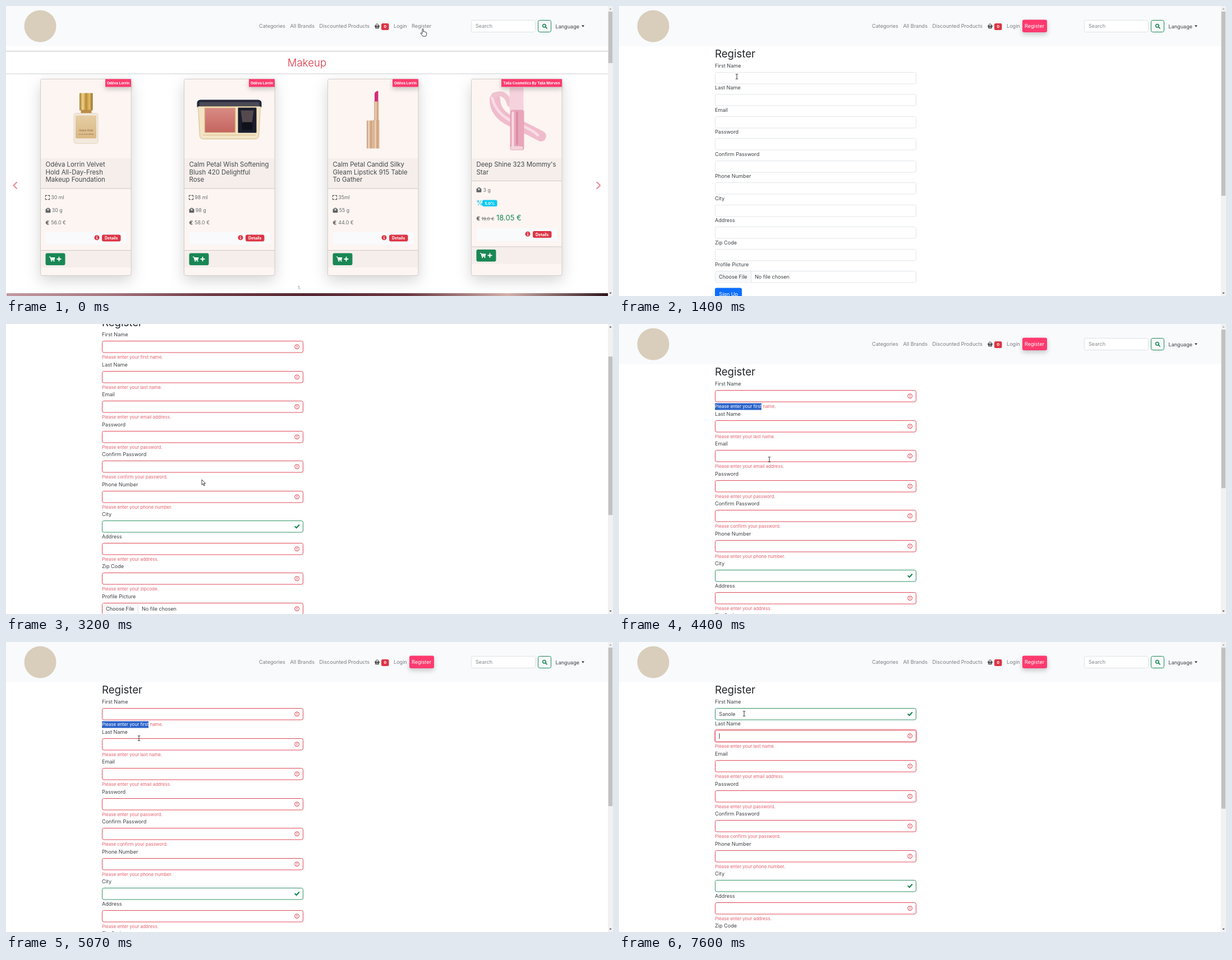
Animation, 1082 px wide and 518 px high, one loop 8000 ms. Source, as an HTML page:

```html
<!DOCTYPE html>
<html lang="en">
<head>
<meta charset="utf-8">
<title>Shop registration</title>
<style>
  html, body { margin: 0; width: 100%; height: 100%; overflow: hidden; background: #fff; }
  svg { display: block; width: 1082px; height: 518px; }
  text { font-family: Inter, "Open Sans", sans-serif; font-weight: 400; white-space: pre; }
  .bold { font-weight: 700; }
  .mid { text-anchor: middle; }
  .thin { font-weight: 300; }
  .line { fill: none; stroke-linecap: round; stroke-linejoin: round; }
  .card { filter: drop-shadow(0 9px 13px rgba(0, 0, 0, .17)); }
  .lift { filter: drop-shadow(0 4px 4px rgba(0, 0, 0, .2)); }
</style>
</head>
<body>
<svg id="stage" viewBox="0 0 1082 518"></svg>
<script>
const RED = '#dc3545', GREEN = '#198754', PINK = '#ff3a6e', INK = '#3d4145', GREY = '#7c7f82';
const LOOP = 8000, STEP = 200 / 3;
const ROW = 39.45, ERROR_HEIGHT = 14.1;

const text = (x, y, s, size = 9.1, fill = INK, cls = '', extra = '') =>
  `<text x="${x}" y="${y}" font-size="${size}" fill="${fill}" class="${cls}" ${extra}>${s}</text>`;
const rect = (x, y, w, h, fill, rx = 0, extra = '') =>
  `<rect x="${x}" y="${y}" width="${w}" height="${h}" rx="${rx}" fill="${fill}" ${extra}/>`;
const path = (d, fill, extra = '') => `<path d="${d}" fill="${fill}" ${extra}/>`;
const line = (d, color, width = 1, extra = '') =>
  `<path d="${d}" class="line" stroke="${color}" stroke-width="${width}" ${extra}/>`;
const group = (content, extra = '') => `<g ${extra}>${content}</g>`;
const at = (x, y, content) => group(content, `transform="translate(${x} ${y})"`);
const gradient = (id, colors, vertical) =>
  `<linearGradient id="${id}" ${vertical ? 'x2="0" y2="1"' : ''}>` +
  colors.map((c, i) => `<stop offset="${i / (colors.length - 1)}" stop-color="${c}"/>`).join('') +
  '</linearGradient>';

const icons = {
  basket: path('M-4.5-1h9v1.4h-.7L3 4.2h-6L-3.8.4h-.7z', '#444') +
    line('M-2.8-1 -.9-4M2.8-1 .9-4', '#444', 1.2) + line('M-1.4 1v2M0 1v2M1.4 1v2', '#f8f9fa', .6),
  search: line('M1.2 1.2 3.8 3.8', GREEN, 1.7) + `<circle cx="-.8" cy="-.8" r="2.8" fill="none" stroke="${GREEN}" stroke-width="1.5"/>`,
  expand: line('M-3.6-1.2v-2.4h2.4M1.2-3.6h2.4v2.4M3.6 1.2v2.4h-2.4M-1.2 3.6h-2.4v-2.4', '#555', 1.1),
  weight: rect(-4.4, -2.4, 8.8, 6.6, '#5f6265', 1) + '<circle cy="-1.5" r="3" fill="#5f6265"/><circle cy="-1.2" r="1.7" fill="#fcf5f2"/>' + line('M0-.8.7-2', '#5f6265', .8),
  euro: line('M2.2-2.8Q-1.6-4.4-1.6 0T2.2 2.8M-2.8-.8h4M-2.8.9h3.6', '#555', 1.2),
  info: `<circle r="4.5" fill="${RED}"/>` + line('M-.5-.3h.6v2.2m-.8.1h1.6', '#fff', 1) + '<circle cy="-2.2" r=".8" fill="#fff"/>',
  cart: line('M-5.2-3.8h1.6l1.5 5.6h5.6', '#fff', 1.2) + path('M-3.4-3h8.4L4 1h-6.2z', '#fff') +
    '<circle cx="-1.3" cy="3.6" r="1.1" fill="#fff"/><circle cx="3" cy="3.6" r="1.1" fill="#fff"/>',
  plus: line('M-3.2 0h6.4M0-3.2v6.4', '#fff', 1.9),
  alert: `<circle r="3.9" fill="none" stroke="${RED}" stroke-width="1"/>` + line('M0-1.8v2M0 1.8v.1', RED, 1.1),
  check: line('M-3.4.3-1 2.7 3.6-2.5', GREEN, 2.1),
  login: line('M-4 0h5M-.8-2.4 1.6 0-.8 2.4M2-3.4h2v6.8h-2', '#555', 1.4),
  home: path('M-5 .3 0-4.2 5 .3 4.3 1 3.6.5V4H1V1h-2v3h-2.6V.5L-4.3 1z', '#555'),
};

function header() {
  const register = rect(719, 24.5, 44, 22.5, PINK, 3, 'class="lift"') + text(723, 39.2, 'Register', 9.1, '#fff');
  return rect(0, 0, 1073, 71.5, '#f8fafc') +
    '<circle cx="61" cy="36" r="28.5" fill="#d9cebb"/>' +
    [[451, 'Categories'], [506.5, 'All Brands'], [558.5, 'Discounted Products'], [691, 'Login'], [723, 'Register']]
      .map(([x, s]) => text(x, 39.2, s, 9.1, GREY)).join('') +
    at(661.5, 36, icons.basket) + rect(669, 31, 13.5, 12, RED, 2.5) + text(675.8, 39.4, '0', 6.8, '#fff', 'bold mid') +
    group(register, 'id="register"') +
    rect(829.5, 25.5, 114, 21, '#fff', 3, 'stroke="#dee2e6"') + text(837, 39.4, 'Search', 9.1, '#85888b') +
    rect(948.5, 25.5, 23, 21, '#f8fafc', 3, `stroke="${GREEN}"`) + at(960.3, 36, icons.search) +
    text(979.5, 39.6, 'Language') + path('M1026 34.5h5l-2.5 2.9z', '#222');
}

const products = [
  {
    brand: 'Odéva Lorrin', tag: 46, title: ['Odéva Lorrin Velvet', 'Hold All-Day-Fresh', 'Makeup Foundation'],
    size: '30 ml', weight: '30 g', price: '56.0 €',
    art: rect(69.5, 25, 23.5, 31, 'url(#gold)', 1) + rect(72, 55, 19, 8, '#b98d45') +
      rect(59.5, 61, 43, 54, '#f3e9dd', 4, 'stroke="#d9c9b5" stroke-width=".7"') + rect(62.5, 65, 37, 41, 'url(#cream)', 2) +
      text(81, 93, 'Velvet Hold', 4.6, '#7a6141', 'mid') + text(81, 99, 'All-Day-Fresh Makeup', 2.6, '#7a6141', 'mid'),
  },
  {
    brand: 'Odéva Lorrin', tag: 46, title: ['Calm Petal Wish Softening', 'Blush 420 Delightful', 'Rose'],
    size: '98 ml', weight: '98 g', price: '58.0 €',
    art: path('M23 50V42Q24 37 30 37H131Q137 37 138 42V50z', '#222638') + rect(27, 41, 107, 8, '#4a4a56', 2) +
      path('M25 49H136L133 102Q132 107 127 107H34Q29 107 28 102z', '#f3e4c6', 'stroke="#cfae72" stroke-width=".8"') +
      rect(36, 51, 56, 45, '#d9b782', 1) + rect(37.5, 52, 53, 43, 'url(#blush)', 1) +
      rect(96, 51, 33, 45, '#1b1d2b', 1) + path('M101 56h23l-3 22h-17z', '#544a4d') + rect(103, 77, 19, 14, '#0f111b', 2) +
      line('M34 100H127', '#d8bb84', 1),
  },
  {
    brand: 'Odéva Lorrin', tag: 46, title: ['Calm Petal Candid Silky', 'Gleam Lipstick 915 Table', 'To Gather'],
    size: '35ml', weight: '55 g', price: '44.0 €',
    art: path('M83.5 41V26Q84 22 90 21V41z', '#d42c79') + rect(83, 40, 8, 35, 'url(#copper)') +
      rect(81, 73, 11, 51, 'url(#copper)') + rect(69.5, 74, 11, 50, 'url(#copper)', 1),
  },
  {
    brand: 'Talia Cosmetics By Talia Morven', tag: 108, title: ["Deep Shine 323 Mommy's", 'Star'], weight: '3 g', sale: true,
    art: line('M42 36Q42 62 72 76T124 102', '#f0bccd', 19) + line('M37 33Q44 64 78 78T118 100', '#f8dbe5', 5) +
      line('M40 29Q62 20 68 45', '#f0c3d1', 9) +
      rect(68, 15, 25, 41, '#f6d2dd', 2) + rect(69, 55, 25, 72, '#e9a6ba', 4) +
      rect(72, 58, 4, 64, '#f8d9e2', 2) + rect(80, 58, 3, 60, '#d988a2', 1) + rect(70, 120, 22, 6, '#f4d5dd', 3),
  },
];

function card(p, i) {
  const x = 61.5 + 256 * i, up = p.sale ? 6.5 : 0, titleEnd = p.sale ? 182 : 195.5;
  const label = (lx, y, s) => text(lx, y, s, 8.9, '#6b6f72');
  const spec = (y, icon, s) => at(12.5, y, icons[icon]) + label(18.7, y + 3.3, s);
  const specs = p.sale
    ? at(13.5, 198, icons.weight) + label(21, 201.3, p.weight) +
      text(9, 225, '%', 11.5, '#0dcaf0', 'bold') + rect(19.5, 216, 26.5, 11.5, '#0dcaf0', 2.5) + text(32.8, 224.4, '5.0%', 6.8, '#fff', 'bold mid') +
      at(12.5, 249, icons.euro) + text(18, 252, '19.0 €', 8, '#6b6f72', '', 'text-decoration="line-through"') +
      text(44.5, 252.3, '18.05 €', 13, GREEN)
    : spec(211.5, 'expand', p.size) + at(13.5, 234.5, icons.weight) + label(20.2, 237.8, p.weight) +
      spec(256.5, 'euro', p.price);
  const actions =
    rect(9, 273, 144, 23, '#f8fafc', 3) + at(100.5, 283.3, icons.info) +
    rect(109.5, 278, 33.5, 12, RED, 3) + text(126.2, 286.6, 'Details', 6.9, '#fff', 'bold mid') +
    rect(0, 306, 161, 30.5, '#f5eeeb') + line('M0 306H161', '#cfc8c5') +
    rect(9, 311, 35, 21.5, GREEN, 3) + at(21, 321.5, icons.cart) + at(33, 321.5, icons.plus);
  return at(x, 130.5,
    rect(0, 0, 161.5, 351, '#fcf5f2', 3, 'class="card"') + p.art +
    rect(0, 141.5, 161, titleEnd - 141.5, '#f5eeeb') + line(`M0 ${titleEnd}H161`, '#cfc8c5') +
    p.title.map((s, n) => text(9, 156.5 + 13.5 * n, s, 11.4, '#44484b')).join('') +
    specs + at(0, -up, actions) +
    rect(0, 0, 161.5, 351, 'none', 3, 'stroke="#d3ccc9"') +
    rect(161.5 - p.tag, 0, p.tag, 14, PINK, 0, 'class="lift"') +
    text(161.5 - p.tag / 2, 9.4, p.brand, 6.4, '#fff', 'bold mid'));
}

function home() {
  const rule = y => line(`M0 ${y}H1073`, '#cdcfd1') + line(`M0 ${y + 1}H1073`, '#eee');
  return rule(80.5) + rule(121) + text(536.5, 108, 'Makeup', 18.6, RED, 'thin mid') +
    products.map(card).join('') +
    line('M19 315 13.5 320.5 19 326M1053.5 315 1059 320.5 1053.5 326', RED, 2.4, 'opacity=".55"') +
    text(520, 506, '1.', 8, GREY) + rect(1, 513, 1072, 5, 'url(#banner)');
}

const fields = [
  ['First Name', 'enter your first name'], ['Last Name', 'enter your last name'], ['Email', 'enter your email address'],
  ['Password', 'enter your password'], ['Confirm Password', 'confirm your password'], ['Phone Number', 'enter your phone number'],
  ['City'], ['Address', 'enter your address'], ['Zip Code', 'enter your zipcode'], ['Profile Picture', 'choose your picture'],
];

function field([label, message], i) {
  const isFile = i === 9;
  const note = color => text(171, 150.4, `Please ${message}.`, 8, color);
  const selected = i ? '' : group(rect(171, 141.5, 83, 12, '#2a62c9') + note('#fff'),
    'class="selection" clip-path="url(#selected)"');
  return group(
    text(171, 110.2, label) +
    rect(170.4, 117.4, 360.2, 22.7, 'none', 4, 'class="ring" stroke-width="2.6" stroke-opacity=".28" opacity="0"') +
    rect(171.5, 118.5, 358, 20.5, '#fff', 3, 'class="box" stroke-width=".9"') +
    (isFile ? rect(172, 119, 63, 19.5, '#f8f9fa', 2) + line('M235.5 119V138.5', '#dee2e6', 1, 'class="box"') +
      text(178, 132, 'Choose File') + text(242, 132, 'No file chosen') : '') +
    group((message ? note('#e4606d') : '') + selected, 'class="error"') +
    group(at(518.7, 128.7, icons.alert), 'class="alert"') + group(at(518.7, 128.5, icons.check), 'class="check"'),
    'class="field"');
}

function form() {
  const tail = rect(171, 503.5, 48, 21.5, '#0d6efd', 3, 'id="submit"') + text(178.3, 517.6, 'Sign Up', 9.1, '#fff') +
    line('M171 534.5H530', '#c6c8ca') + text(171, 554, 'Already have an account?') +
    text(284, 554, 'Login', 9.1, '#2b7de0', '', 'text-decoration="underline"') +
    line('M0 591.5H1073', '#f0f1f2') +
    [[96, 'Our Shop'], [543, 'My Account'], [811, 'Information']].map(([x, s]) => text(x, 608.3, s, 16.2, RED)).join('') +
    rect(96, 617, 138, 27, PINK, 3, 'class="lift"') + text(107, 635.8, 'Stay Beautiful', 16.6, '#fff', 'bold') +
    at(547.5, 628.5, icons.login) + text(554.5, 632, 'Login', 9.1, GREY) +
    at(816, 628.5, icons.home) + text(823.5, 632, 'Home', 9.1, GREY);
  return text(171, 92, 'Register', 18.6, '#212529') + fields.map(field).join('') + group(tail, 'id="tail"') +
    text(178.3, 132, '', 9.1, INK, '', 'id="typed"') + rect(0, 0, .9, 10, '#222', 0, 'id="caret"');
}

const cursors =
  group(path('M-1 .8a1 1 0 0 1 2 0v4.2l.4-.6 1.8.4.3.4 1.6.3.3.5 1.3.4v3q-.3 2-1.2 3.6h-5.4l-4-5q-.2-1.4 1.2-1l1.7 1.3z', '#fff', 'stroke="#111" stroke-width=".8"'), 'class="pointer"') +
  group(path('M0 0v9.3l2.1-2 1.6 3.6 1.5-.7-1.6-3.4h3z', '#fff', 'stroke="#111" stroke-width=".8"'), 'class="pointer"') +
  group(line('M-1.8-4.3H-.6L0-3.8.6-4.3H1.8M0-3.8V3.8M-1.8 4.3H-.6L0 3.8.6 4.3H1.8', '#222', .9), 'class="pointer"');

const stage = document.getElementById('stage');
stage.innerHTML = '<defs>' +
  gradient('gold', ['#a97b2c', '#f0d48c', '#b98a36', '#e2bf6c', '#94681f']) +
  gradient('copper', ['#c0926f', '#f3d8be', '#cc9f7b', '#e2bb99']) +
  gradient('cream', ['#e6cda4', '#dab884'], true) +
  gradient('blush', ['#d98a84', '#c4655f'], true) +
  gradient('banner', ['#c39aa2', '#a87780', '#703c47', '#552631', '#6b3843', '#d3b0ab', '#2e151c']) +
  `<clipPath id="selected">${rect(171, 141, 0, 13, '#000', 0, 'id="selection-clip"')}</clipPath></defs>` +
  group(header() + group(home(), 'id="home"') + group(form(), 'id="form"'), 'id="page"') +
  rect(1073, 0, 9, 518, '#f1f1f1') + rect(1073.7, 10, 7.4, 0, '#c1c1c1', 0, 'id="thumb"') +
  path('M1075.3 6.3h4.4l-2.2-2.6z', '#a3a3a3', 'id="up"') + path('M1075.3 511.7h4.4l-2.2 2.6z', '#505050') + cursors;

const get = id => document.getElementById(id);
const set = (el, attrs) => Object.entries(attrs).forEach(([k, v]) => el.setAttribute(k, v));
const move = (el, x, y) => set(el, { transform: `translate(${x} ${y})` });
const show = (el, on) => { if (el) el.style.display = on ? '' : 'none'; };
const clamp = v => Math.min(1, Math.max(0, v));
const rows = [...stage.querySelectorAll('.field')];
const pointers = [...stage.querySelectorAll('.pointer')];

const HAND = 0, ARROW = 1, BEAM = 2;
const pointerKeys = [
  [0, 743, 41, HAND], [930, 743, 41, ARROW], [1330, 225, 119, BEAM], [1404, 210, 126, BEAM], [1730, 205, 200, BEAM],
  [2400, 197, 395, HAND], [2600, 195.5, 407, HAND], [2930, 195.5, 407, ARROW], [3204, 349, 278, ARROW], [3400, 220, 165, BEAM],
  [3530, 171, 148, BEAM], [3930, 254, 148, BEAM], [4130, 278, 190, BEAM], [4404, 268, 242, BEAM], [4800, 268, 242, BEAM],
  [5070, 237, 172, BEAM], [5470, 223, 128, BEAM],
];
const scrollKeys = [[0, 0], [1800, 0], [2270, 113], [3000, 113], [3204, 88], [3470, 0],
  [4404, 0], [4730, 56], [4930, 56], [5070, 0]];
const typeTimes = [6330, 6530, 6730, 6870, 7070, 7200];

function sample(keys, t, column) {
  const i = keys.findLastIndex(k => k[0] <= t), a = keys[i], b = keys[i + 1] || a;
  return a[column] + (b[column] - a[column]) * (b === a ? 0 : (t - a[0]) / (b[0] - a[0]));
}

function drawFields(t) {
  const checked = t >= 2870, firstDone = t >= 6530;
  const focus = [clamp((t - 5400) / 150) * clamp((7600 - t) / 150), clamp((t - 7470) / 130)];
  let shift = 0, errors = 0;
  rows.forEach((row, i) => {
    const valid = i === 6 || (i === 0 && firstDone), failed = checked && !valid;
    const color = !checked ? '#dee2e6' : valid ? GREEN : RED;
    move(row, 0, Math.round(i * ROW + shift));
    row.querySelectorAll('.box').forEach(el => set(el, { stroke: color }));
    set(row.querySelector('.ring'), { stroke: color, opacity: focus[i] || 0 });
    show(row.querySelector('.error'), failed);
    show(row.querySelector('.alert'), failed);
    show(row.querySelector('.check'), checked && valid);
    if (failed) { shift += ERROR_HEIGHT; errors++; }
  });
  move(get('tail'), 0, Math.round(shift));
  return errors;
}

function drawTyping(t) {
  const typed = get('typed'), caret = get('caret'), onLast = t >= 7470;
  typed.textContent = 'Sanole'.slice(0, typeTimes.filter(k => k <= t).length);
  const x = onLast ? 178.5 : 178.5 + typed.getComputedTextLength();
  set(caret, { x, y: onLast ? 163 : 123.5 });
  show(caret, t >= 5400 && !(t >= 5930 && t < 6330));
}

function render(time) {
  const t = Math.floor(time / STEP + .01) * STEP + 4;
  const atHome = t < 930, scroll = Math.round(sample(scrollKeys, t, 1));
  show(get('home'), atHome);
  show(get('form'), !atHome);
  move(get('page'), 0, -scroll);
  set(get('register'), { opacity: atHome ? clamp((t - 4) / 600) : 1 });
  set(get('submit'), { fill: t >= 2400 && t < 2930 ? '#0b5ed7' : '#0d6efd' });

  const errors = drawFields(t);
  drawTyping(t);
  const x = sample(pointerKeys, t, 1), y = sample(pointerKeys, t, 2);
  const kind = pointerKeys.findLast(k => k[0] <= t)[3];
  pointers.forEach((el, i) => { show(el, i === kind); move(el, x, y); });
  set(get('selection-clip'), { width: t >= 3930 ? 83 : Math.max(0, x - 171) });
  show(stage.querySelector('.selection'), t >= 3530 && t < 5400);

  const pageHeight = atHome ? 2804 : 784 + errors * ERROR_HEIGHT, ratio = 498 / pageHeight;
  set(get('thumb'), { y: 10 + scroll * ratio, height: 518 * ratio });
  set(get('up'), { fill: scroll > 0 ? '#505050' : '#a3a3a3' });
}

const start = performance.now();
function tick() {
  render((performance.now() - start) % LOOP);
  requestAnimationFrame(tick);
}
tick();
</script>
</body>
</html>
```
